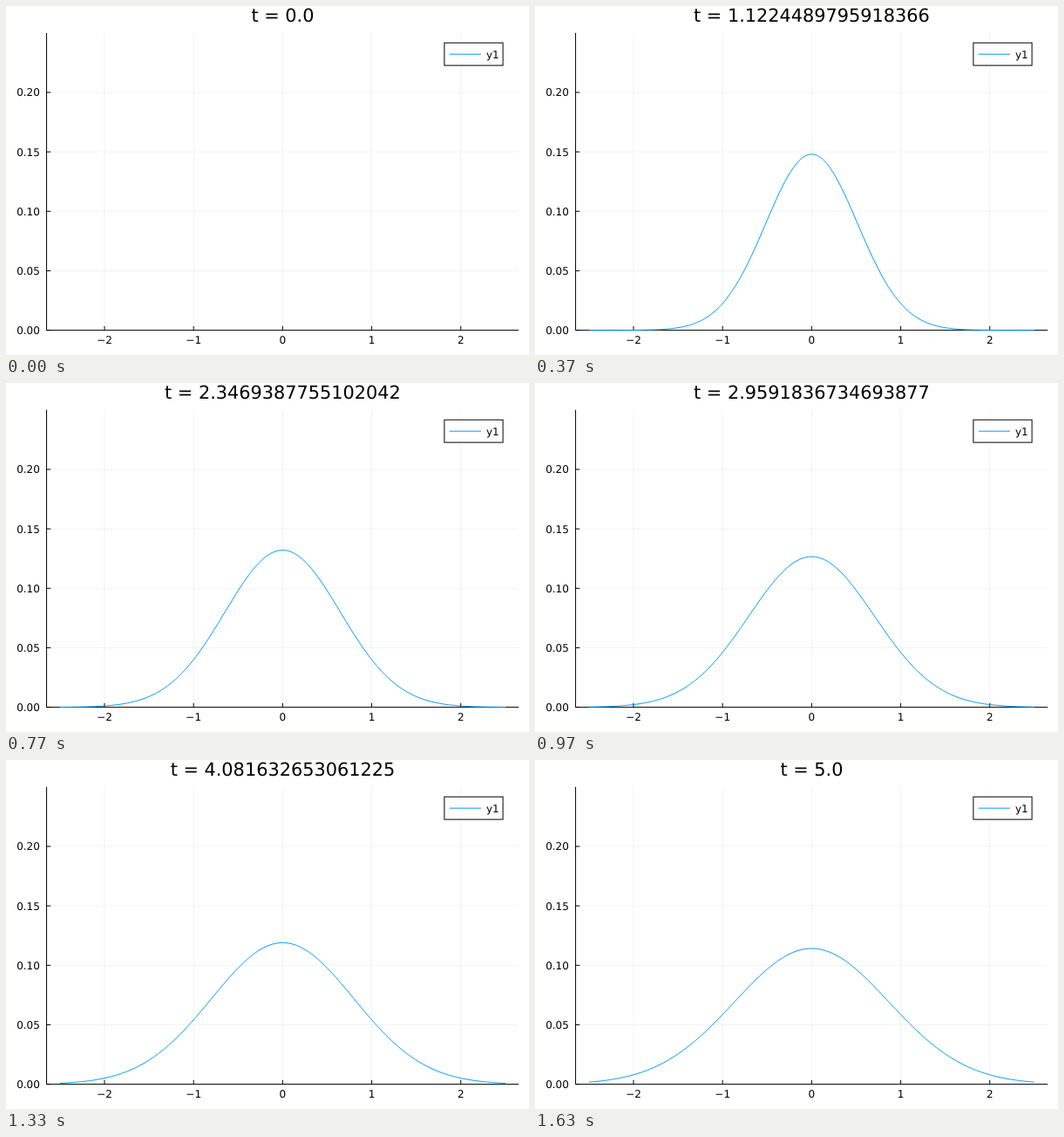
Recreate the animation shown at these times as an HTML page. Size 600x400 px, loop 1.66 s.

```html
<!DOCTYPE html>
<html lang="en">
<head>
<meta charset="utf-8">
<title>Spreading bell curve</title>
<style>
  html, body { margin: 0; width: 100%; height: 100%; overflow: hidden; background: #fff; }
  svg { display: block; width: 600px; height: 400px; }
  text { font: 12px "DejaVu Sans", sans-serif; text-rendering: geometricPrecision; }
  #title { font-size: 20.83px; }
  .mid { text-anchor: middle; }
  .end { text-anchor: end; }
  .grid { stroke: #000; stroke-opacity: .1; stroke-width: .5; }
  .axis { stroke: #000; fill: none; }
  .series { stroke: #009af9; fill: none; stroke-linejoin: round; }
</style>
</head>
<body>
<svg viewBox="0 0 600 400">
  <g id="grid" class="grid"></g>
  <g id="axes" class="axis"></g>
  <g id="labels"></g>
  <path id="curve" class="series"/>
  <rect x="502.9" y="42.2" width="67.2" height="25.9" fill="#fff" stroke="#000"/>
  <path class="series" d="M508.9 55.2H545"/>
  <text x="551" y="59.6">y1</text>
  <text id="title" class="mid" x="317.4" y="18"></text>
</svg>
<script>
  const LOOP = 1660, LAST = 49, T_MAX = 5;
  const plot = { left: 46.57, right: 588.19, top: 30.87, bottom: 371.61 };
  const TICK = 4.7;
  const el = id => document.getElementById(id);
  const px = x => 317.38 + x * (plot.right - plot.left) / 5.3;
  const py = y => plot.bottom - y * (plot.bottom - plot.top) / 0.25;

  const add = (parent, tag, attrs, text = "") => {
    const node = document.createElementNS(parent.namespaceURI, tag);
    for (const key in attrs) node.setAttribute(key, attrs[key]);
    node.textContent = text;
    parent.append(node);
  };
  const path = (id, d) => add(el(id), "path", { d });
  const label = (cls, x, y, text) => add(el("labels"), "text", { class: cls, x, y }, text);

  function drawAxes() {
    const { left, right, top, bottom } = plot;
    path("axes", `M${left} ${top}V${bottom}H${right}`);
    for (let x = -2; x <= 2; x++) {
      path("grid", `M${px(x)} ${top}V${bottom}`);
      path("axes", `M${px(x)} ${bottom}v${-TICK}`);
      label("mid", px(x), 387.4, String(x).replace("-", "\u2212"));
    }
    for (let i = 0; i <= 4; i++) {
      const y = py(i * 0.05);
      path("grid", `M${left} ${y}H${right}`);
      path("axes", `M${left} ${y}h${TICK}`);
      label("end", 38.9, y + 4.4, (i * 0.05).toFixed(2));
    }
  }

  // Gaussian whose variance grows with t, scaled to unit sum of squares on the grid
  function curvePath(t) {
    const step = 0.02, spread = 1 + t;
    const peak = Math.sqrt(step) * (8 / (Math.PI * spread)) ** 0.25;
    const points = Array.from({ length: 251 }, (_, i) => {
      const x = -2.5 + i * step;
      return px(x).toFixed(2) + " " + py(peak * Math.exp(-4 * x * x / spread)).toFixed(2);
    });
    return "M" + points.join("L");
  }

  let shown = -1;
  function render() {
    const hundredths = Math.floor(performance.now() % LOOP / 10);
    const step = Math.min(LAST, Math.floor(0.3 * hundredths + 0.15));
    if (step !== shown) {
      shown = step;
      const t = T_MAX * step / LAST;
      el("title").textContent = "t = " + (Number.isInteger(t) ? t.toFixed(1) : t);
      el("curve").setAttribute("d", step ? curvePath(t) : "");
    }
    requestAnimationFrame(render);
  }

  drawAxes();
  render();
</script>
</body>
</html>
```
